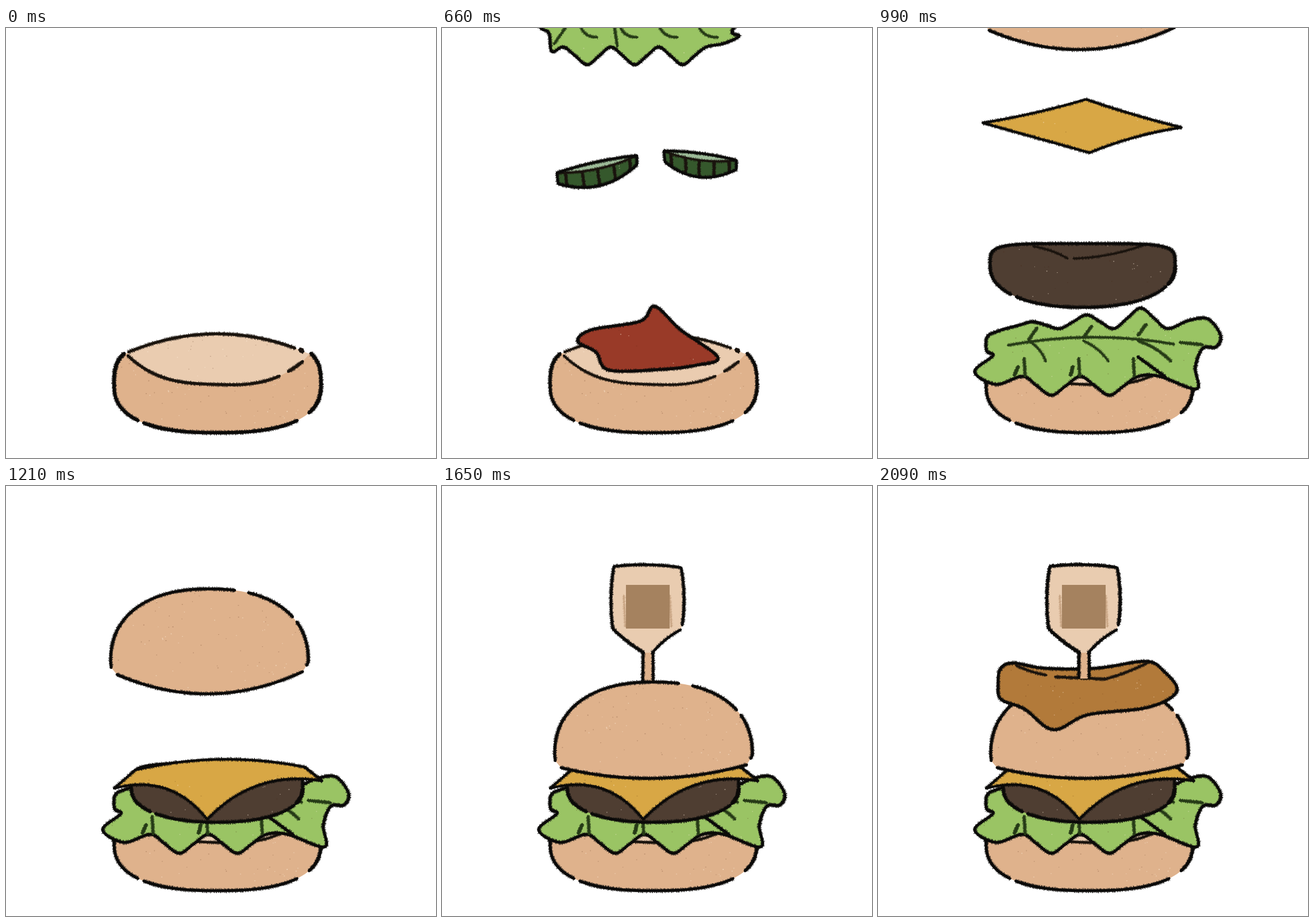
Write an HTML page with a canvas that moves like this. It is 748x748 px and loops after 2310 ms.

```html
<!DOCTYPE html>
<html lang="en">
<head>
<meta charset="utf-8">
<title>Burger stack</title>
<style>
html, body { margin: 0; width: 100%; height: 100%; overflow: hidden; background: #fff; }
canvas { display: block; width: 100vw; height: 100vh; }
</style>
</head>
<body>
<canvas id="stage" width="748" height="748"></canvas>
<script>
const ctx = document.getElementById('stage').getContext('2d');
const STEP = 110, LOOP = 2310, LAST = 19;
const INK = '#0c0b0a', SOFT = '#1a140e', BUN = '#dfb28c', CRUMB = '#eaccb0', KETCHUP = '#993a28',
  PICKLE = '#35582c', PALE = '#9dbb98', LEAF = '#9ac464', VEIN = '#263a17', PATTY = '#4f3e32',
  CHEESE = '#d8a745', RING = '#b27a3a', WOOD = '#e9ccb0', MARK = '#a5825f';

let seed = 1;
function rnd() {
  seed = (seed * 16807) % 2147483647;
  return seed / 2147483647;
}

// Bowed line; a positive bow goes down when drawn left to right.
function arc(x0, y0, x1, y1, bow = 0, power = 2, from = 0, to = 1) {
  const dx = x1 - x0, dy = y1 - y0, len = Math.hypot(dx, dy);
  return Array.from({ length: 41 }, (_, i) => {
    const u = from + (to - from) * i / 40;
    const b = bow * (1 - Math.abs(2 * u - 1) ** power) / len;
    return [x0 + dx * u - dy * b, y0 + dy * u + dx * b];
  });
}

// Part of a superellipse, angles in degrees, clockwise from the right.
function oval(cx, cy, rx, ry, n, from, to) {
  const bend = v => Math.sign(v) * Math.abs(v) ** (2 / n);
  return Array.from({ length: 61 }, (_, i) => {
    const a = (from + (to - from) * i / 60) * Math.PI / 180;
    return [cx + rx * bend(Math.cos(a)), cy + ry * bend(Math.sin(a))];
  });
}

// Row of soft lobes.
function ruffle(x, y, step, count, height, grow = 0) {
  return Array.from({ length: count * 4 + 1 }, (_, i) => {
    const u = i % 4 / 4, lobe = Math.floor(i / 4);
    return [x + step * i / 4, y + height * (1 + grow * lobe) * Math.sin(Math.PI * u) ** 2];
  });
}

// Closed smooth curve through key points.
function smooth(p) {
  const at = i => p[(i + p.length) % p.length];
  return p.flatMap((b, i) => {
    const a = at(i - 1), c = at(i + 1), d = at(i + 2);
    return Array.from({ length: 10 }, (_, s) => {
      const u = s / 10;
      return [0, 1].map(k => b[k] + u * (c[k] - a[k] +
        u * (2 * a[k] - 5 * b[k] + 4 * c[k] - d[k] + u * (3 * (b[k] - c[k]) + d[k] - a[k]))) / 2);
    });
  });
}

function trace(p) {
  ctx.beginPath();
  p.forEach(q => ctx.lineTo(q[0], q[1]));
}

function fill(p, color, specks = 0) {
  trace(p);
  ctx.fillStyle = color;
  ctx.fill();
  const xs = p.map(q => q[0]), ys = p.map(q => q[1]);
  const x = Math.min(...xs), y = Math.min(...ys);
  const w = Math.max(...xs) - x, h = Math.max(...ys) - y;
  ctx.save();
  ctx.clip();
  for (let i = 0; i < specks; i++) {
    ctx.fillStyle = i % 2 ? 'rgba(255,240,220,.45)' : 'rgba(70,30,10,.22)';
    ctx.fillRect(x + rnd() * w, y + rnd() * h, 1 + rnd(), 1 + rnd());
  }
  ctx.restore();
}

// Charcoal line: a solid core with short bristles across it.
function ink(p, w = 6, color = INK) {
  ctx.strokeStyle = color;
  ctx.lineCap = ctx.lineJoin = 'round';
  ctx.lineWidth = w * 0.78;
  trace(p);
  ctx.stroke();
  ctx.lineWidth = 0.9;
  ctx.beginPath();
  for (let i = 1; i < p.length; i++) {
    const [ax, ay] = p[i - 1], dx = p[i][0] - ax, dy = p[i][1] - ay, d = Math.hypot(dx, dy);
    const n = Math.ceil(d / 1.7);
    for (let k = 0; k < n; k++) {
      const u = (k + rnd()) / n, l = w * 0.36 + rnd() * 2, r = w * 0.36 + rnd() * 2;
      const nx = (dx / 4 - dy) / d, ny = (dx + dy / 4) / d;
      const x = ax + dx * u, y = ay + dy * u;
      ctx.moveTo(x + nx * l, y + ny * l);
      ctx.lineTo(x - nx * r, y - ny * r);
    }
  }
  ctx.stroke();
}

function blob(p, color, specks = 20, w = 6) {
  fill(p, color, specks);
  ink([...p, p[0]], w);
}

function put(part, dx = 0, dy = 0, ...args) {
  ctx.save();
  ctx.translate(dx, dy);
  seed = 4711;
  part(...args);
  ctx.restore();
}

function below(y, paint) {
  ctx.save();
  ctx.beginPath();
  ctx.rect(0, 0, 748, y);
  ctx.clip();
  paint();
  ctx.restore();
}

function baseBun(w) {
  const low = (a, b) => oval(368, 620, 180, 84, 2.5, a, b);
  const high = (a, b) => oval(368, 620, 180, 84, 3, a, b);
  const back = (a, b) => arc(210, 565, 528, 567, -34, 2, a, b);
  const front = (a, b) => arc(212, 570, 516, 580, 45, 3, a, b);
  fill([...low(0, 180), ...high(180, 211), ...high(329, 360)], BUN, 90);
  fill([...back(0, 1), ...front(1, 0)], CRUMB, 40);
  [[...high(329, 360), ...low(0, 31)], low(44, 131), [...low(136, 180), ...high(180, 211)]]
    .forEach(p => ink(p, w));
  [back(0.01, 0.92), back(0.945, 0.965), front(0, 0.87), front(0.92, 1)]
    .forEach(p => ink(p, w - 1, SOFT));
}

function ketchupFall() {
  blob(smooth([[207, 262], [240, 240], [300, 223], [380, 213], [440, 221], [482, 247], [479, 263],
    [430, 269], [406, 304], [372, 282], [330, 275], [250, 289]]), KETCHUP);
}

function ketchupRest() {
  blob(smooth([[236, 545], [260, 525], [345, 510], [370, 484], [415, 525], [480, 573],
    [440, 587], [380, 594], [290, 595], [268, 564]]), KETCHUP);
}

function slice(x0, y0, x1, y1) {
  const back = arc(x0, y0, x1, y1, -4), rim = arc(x0, y0, x1, y1, 8);
  const base = arc(x0 + 2, y0 + 19, x1, y1 + 16, 20);
  const edge = [...back, ...base.slice().reverse()];
  fill(edge, PICKLE, 10);
  fill([...back.slice(3, 37), ...rim.slice(3, 37).reverse()], PALE);
  ink(rim, 4, SOFT);
  for (let i = 4; i < 40; i += 8) ink(arc(...rim[i], ...base[i], i % 3 - 1), 4, SOFT);
  ink([...edge, edge[0]], 5.5);
}

function picklesHigh() {
  slice(183, 61, 336, 16);
  slice(368, 15, 511, 28);
}

function picklesLow() {
  slice(200, 252, 339, 222);
  slice(386, 214, 512, 230);
}

function leafFall() {
  blob(smooth([[172, 0], [186, 9], [191, 41], ...ruffle(211, 33, 83, 3, 31), [490, 27], [517, 14],
    [505, 4], [545, -45], ...ruffle(200, -65, 94, 3, -12, 1).reverse(), [158, -25]]), LEAF, 40);
  for (let i = 0; i < 4; i++) ink(arc(240 + 68 * i, -8, 270 + 70 * i, 16, 8), 4.5, VEIN);
  ink(arc(220, -8, 195, 28), 4.5, VEIN);
  ink(arc(299, -8, 305, 32), 4.5, VEIN);
  ink(arc(185, -30, 510, -32, -10), 4.5, VEIN);
}

function leafRest() {
  blob(smooth([[189, 562], [190, 537], [210, 527], ...ruffle(222, 523, 94, 3, -12, 1), [540, 509],
    [574, 506], [596, 535], [588, 555], [565, 557], [552, 590], [554, 628], [490, 606],
    ...ruffle(251, 606, 101, 2, 33).reverse(), [205, 620], [168, 598], [200, 570]]), LEAF, 60);
  ink(arc(226, 552, 515, 550, -13), 4.5, VEIN);
  for (let i = 0; i < 3; i++) {
    const x = 262 + 95 * i;
    ink(arc(x, 543 - 4 * i, x + 15, 521 - 3 * i), 4.5, VEIN);
    ink(arc(x, 544, x + 30 + 14 * i, 580, -4), 4.5, VEIN);
    ink(arc(x - 8, 574, x - 6, 606), 4.5, VEIN);
    if (i < 2) ink(arc(x - 18, 588, x - 25 + 3 * i, 605), 4.5, VEIN);
  }
  ink(arc(525, 547, 565, 551), 5, VEIN);
  ink(arc(452, 572, 500, 607));
}

function patty(cx, cy, rx, up, low) {
  const top = oval(cx, cy, rx, up, 5, 180, 360);
  const base = (a, b) => oval(cx, cy, rx, low, 2.2, a, b);
  const edge = cy - up + 5;
  fill([...top, ...base(0, 180)], PATTY, 40);
  ink(arc(cx - 86, edge, cx - 26, edge + 21, -3), 4, SOFT);
  ink(arc(cx - 16, edge + 21, cx + 105, edge - 2, 5), 4, SOFT);
  ink([...base(139, 180), ...top, ...base(0, 24)]);
  ink(base(27, 134));
}

function cheeseFall() {
  blob([...arc(182, 165, 362, 124, 3), ...arc(362, 124, 528, 173, 2),
    ...arc(528, 173, 368, 217, 5), ...arc(368, 217, 182, 165)], CHEESE, 24, 5);
}

function cheeseRest() {
  blob([...arc(188, 526, 225, 494), ...arc(225, 494, 520, 489, -16), ...arc(520, 489, 550, 513),
    ...arc(550, 513, 350, 580, 28), ...arc(350, 580, 188, 526, 28)], CHEESE, 24, 5);
}

function topBun(sag) {
  const dome = (a, b) => oval(368, 468, 172, 127, 2.3, a, b);
  const base = arc(207, 490, 530, 485, sag, 2);
  fill([[197, 478], ...dome(180, 360), [537, 474], ...base.slice().reverse()], BUN, 110);
  [[[197, 478], ...dome(180, 282)], dome(290, 325), [...dome(330, 360), [537, 474]], base]
    .forEach(p => ink(p));
}

function pick() {
  const left = arc(350, 288, 359, 605, 4), right = arc(367, 288, 359, 605, -3);
  fill([...left, ...right.slice().reverse()], BUN);
  ink(left, 5.5);
  ink(right, 5.5);
  const head = [...arc(351, 290, 297, 248, -2), ...arc(297, 248, 299, 140, -4),
    ...arc(299, 140, 416, 142, -4), ...arc(416, 142, 418, 242, -4)];
  const chin = arc(415, 250, 366, 290, 3);
  fill([...head, ...chin], WOOD);
  for (const x of [316, 396]) ink(arc(x, 190, x + 3, 245), 3, 'rgba(160,115,75,.3)');
  ctx.fillStyle = MARK;
  ctx.fillRect(320, 172, 76, 76);
  ink(head, 5.5);
  ink(chin, 5.5);
}

function ringFall() {
  blob(smooth([[204, 120], [240, 118], [300, 110], [440, 124], [505, 135], [508, 155], [519, 185],
    [505, 219], [400, 213], [300, 230], [258, 221], [210, 178], [198, 160]]), RING, 50);
  fill([...arc(328, 143, 390, 141, -4), ...arc(390, 141, 328, 143, -5)], WOOD);
  ink(arc(326, 141, 392, 140, -4), 4, SOFT);
  ink([...arc(235, 122, 340, 147, 1), ...arc(340, 147, 505, 135, -1)], 4.5, SOFT);
}

function ringRest() {
  blob(smooth([[213, 318], [235, 308], [290, 317], [380, 317], [465, 305], [496, 321], [520, 357],
    [470, 385], [365, 398], [305, 424], [255, 388], [214, 371], [209, 345]]), RING, 50);
  ink(arc(240, 312, 293, 329, 2), 4.5, SOFT);
  ink([...arc(308, 332, 395, 336), ...arc(395, 336, 468, 308, 2)], 4.5, SOFT);
}

function draw(n) {
  const during = (from, to) => n >= from && n < to;
  ctx.fillStyle = '#fff';
  ctx.fillRect(0, 0, 748, 748);
  put(baseBun, 0, 0, n ? 6 : 7);

  if (during(2, 6)) put(ketchupFall, 0, (n - 4) * 145);
  if (during(6, 9)) put(ketchupRest);

  if (during(4, 6)) put(picklesHigh, 0, (n - 4) * 99);
  if (during(6, 9)) put(picklesLow, 0, (n - 6) * 147);

  if (during(6, 9)) put(leafFall, 0, (n - 6) * 192);
  if (n >= 9) put(leafRest);

  if (during(7, 10)) put(patty, 0, (n - 9) * 190, 356, 415, 161, 40, 71);
  if (n >= 10) put(patty, 0, 0, 367, 527, 149, 44, 58);

  if (during(8, 11)) put(cheeseFall, 0, (n - 9) * 175);
  if (n >= 11) put(cheeseRest);

  // The stick sinks behind the crown of the bun.
  if (n >= 12) {
    const lift = Math.min(0, (n - 15) * 165);
    below(342, () => put(pick, lift ? -13 : 0, lift));
  }
  if (during(9, 12)) put(topBun, -14, (n - 12) * 162, 36);
  if (n >= 12) put(topBun, 0, 0, 21);

  if (during(16, 18)) put(ringFall, 0, (n - 17) * 190);
  if (n >= 18) {
    const lift = (n - LAST) * 95;
    put(ringRest, 0, lift);
    below(335 + lift, () => put(pick));
  }
}

let shown = -1;
function tick() {
  const n = Math.min(LAST, Math.floor(performance.now() % LOOP / STEP));
  if (n !== shown) draw(shown = n);
  requestAnimationFrame(tick);
}
tick();
</script>
</body>
</html>
```
